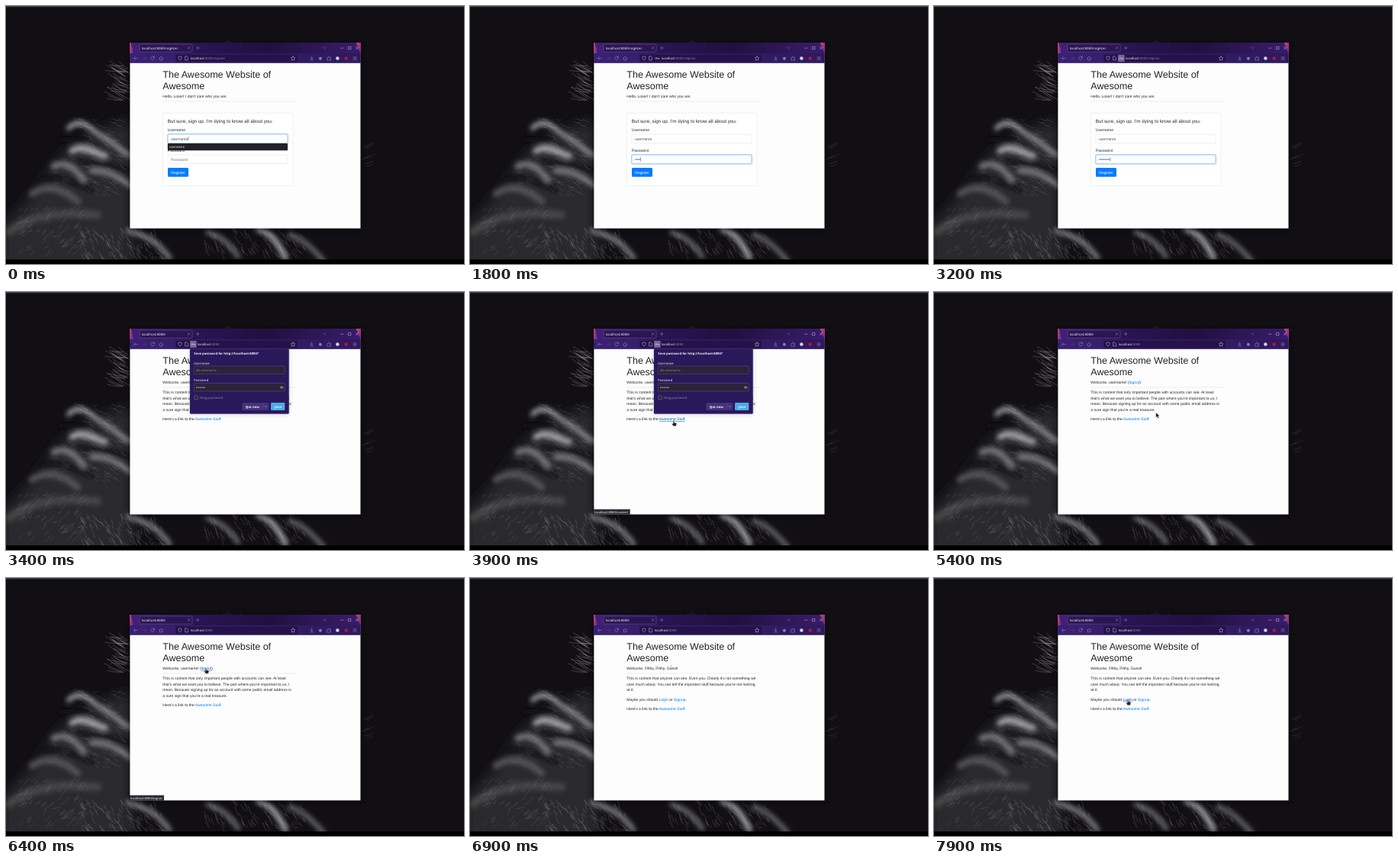
Write an HTML page that moves like this. It is 600 by 338 pixels and loops after 8000 ms.

```html
<!DOCTYPE html>
<html lang="en">
<head>
<meta charset="utf-8">
<title>Sign-up walkthrough</title>
<style>
html, body { margin: 0; width: 100%; height: 100%; overflow: hidden; background: #110f13; }
svg { display: block; width: 100%; height: 100%; }
text { white-space: pre; text-rendering: geometricPrecision; }
.page text { font: 5.02px "Liberation Sans", Arial, sans-serif; fill: #212529; }
.page .h1 { font-size: 12.55px; }
.page .h5 { font-size: 6.27px; }
.page .link { fill: #007bff; }
.page .hover { fill: #0056b3; text-decoration: underline; }
.page .value { fill: #495057; }
.page .hint { fill: #6c757d; }
.page .white { fill: #fff; }
.field { fill: #fff; stroke: #ced4da; stroke-width: .4; }
.ring { fill: none; stroke: #80bdff; stroke-width: .6; }
.glow { fill: none; stroke: #007bff; stroke-opacity: .25; stroke-width: 1; }
.ui text { font: 4.2px "Noto Sans", "Open Sans", sans-serif; fill: #f3effc; }
.ui .dim { fill: #8d7fb3; }
.ui .bold { font-weight: 600; }
.ui .key { text-decoration: underline; }
.ui #tab { font-size: 4.4px; }
.ui #statusText { font-size: 4.05px; }
.icon { fill: none; stroke: #cfc3ea; stroke-width: .5; stroke-linecap: round; stroke-linejoin: round; }
.muted { opacity: .7; }
.faint { opacity: .3; }
</style>
</head>
<body>
<svg viewBox="0 0 600 338" preserveAspectRatio="none">
  <defs>
    <filter id="soft" x="-30%" y="-30%" width="160%" height="160%"><feGaussianBlur stdDeviation="3.4"/></filter>
    <filter id="haze" x="-30%" y="-30%" width="160%" height="160%"><feGaussianBlur stdDeviation="9"/></filter>
    <filter id="shade" x="-10%" y="-10%" width="120%" height="120%"><feGaussianBlur stdDeviation="3"/></filter>
    <linearGradient id="bar"><stop offset="0" stop-color="#43207c"/><stop offset=".25" stop-color="#2b1556"/><stop offset=".6" stop-color="#20103f"/><stop offset="1" stop-color="#3a1c6a"/></linearGradient>
    <linearGradient id="tools"><stop offset="0" stop-color="#3a2070"/><stop offset="1" stop-color="#2f195c"/></linearGradient>
    <linearGradient id="pink" x2="1" y2="1"><stop offset="0" stop-color="#f0506e"/><stop offset="1" stop-color="#8a2a94"/></linearGradient>
    <clipPath id="desk"><rect y="2" width="600" height="330"/></clipPath>
  </defs>

  <rect width="600" height="338" fill="#110f13"/>
  <g clip-path="url(#desk)">
    <path d="M166 150C120 160 84 180 60 212 42 244 16 270-8 292V345H166z" fill="#2b2b2d" filter="url(#haze)"/>
    <g filter="url(#soft)" fill="none" stroke-linecap="round">
      <path d="M82 160C92 150 104 152 118 166" stroke="#9a9a9c" stroke-width="6"/>
      <path d="M86 190C100 180 116 194 130 196" stroke="#b2b2b4" stroke-width="7"/>
      <path d="M122 168C138 176 148 190 164 196" stroke="#8d8d90" stroke-width="6"/>
      <path d="M62 210C78 202 92 214 102 228" stroke="#7c7c7f" stroke-width="7"/>
      <path d="M112 216C130 214 148 224 164 236" stroke="#88888b" stroke-width="6"/>
      <path d="M34 246C54 232 76 240 94 256" stroke="#56565a" stroke-width="8"/>
      <path d="M4 296C30 276 70 268 120 274" stroke="#47474a" stroke-width="10"/>
      <path d="M160 294C184 300 202 312 214 330" stroke="#828285" stroke-width="6"/>
      <path d="M264 296C282 302 294 312 304 328" stroke="#6d6d70" stroke-width="6"/>
      <path d="M330 292C350 298 358 314 366 330" stroke="#a2a2a4" stroke-width="7"/>
      <path d="M372 300C390 306 402 318 416 334" stroke="#6a6a6d" stroke-width="6"/>
      <path d="M72 176C88 172 104 178 120 184M48 228C76 222 96 232 112 240M92 206C116 202 140 210 164 218" stroke="#0d0c0f" stroke-width="6"/>
    </g>
    <g id="fur" fill="none" stroke="#d4d4d6" stroke-linecap="round"/>
  </g>
  <rect width="600" height="1.3" fill="#45494c"/>
  <rect y="332" width="600" height="6" fill="#000"/>

  <rect x="162" y="49" width="303" height="244" fill="#000" opacity=".6" filter="url(#shade)"/>
  <rect x="162.4" y="48" width="302" height="243.4" fill="#fdfdfe"/>

  <g class="page">
    <text class="h1" x="205.3" y="94.4">The Awesome Website of</text>
    <text class="h1" x="205.3" y="109.4">Awesome</text>
    <path d="M205.3 125H380" stroke="#000" stroke-opacity=".13" stroke-width=".5"/>

    <g id="register">
      <text x="205.3" y="120.4">Hello, Loser! I don't care who you are.</text>
      <rect x="205.5" y="140.2" width="170.3" height="95.3" rx="1.3" fill="#fff" stroke="#000" stroke-opacity=".14" stroke-width=".4"/>
      <text class="h5" x="211.8" y="152.7">But sure, sign up. I'm dying to know all about you.</text>
      <text x="211.8" y="163.8">Username</text>
      <text x="211.8" y="190.5">Password</text>
      <rect class="field" x="212" y="168" width="157" height="11.7" rx="1.3"/>
      <rect class="field" x="212" y="195" width="157" height="11.7" rx="1.3"/>
      <g id="focusName"><rect class="glow" x="211.5" y="167.5" width="158" height="12.7" rx="1.7"/><rect class="ring" x="212" y="168" width="157" height="11.7" rx="1.3"/></g>
      <g id="focusPass"><rect class="glow" x="211.5" y="194.5" width="158" height="12.7" rx="1.7"/><rect class="ring" x="212" y="195" width="157" height="11.7" rx="1.3"/></g>
      <text class="value" x="216" y="175.7">username</text>
      <text id="hint" class="hint" x="216" y="202.7">Password</text>
      <g id="dots" fill="#495057"/>
      <rect id="caret" width=".45" height="5.4" fill="#222"/>
      <rect x="212" y="212" width="27" height="11.8" rx="1.3" fill="#007bff"/>
      <text class="white" x="216" y="219.7">Register</text>
    </g>

    <g id="member">
      <text x="205.3" y="120.4">Welcome, username! (<tspan id="logout" class="link">logout</tspan>)</text>
      <g id="memberBody">
        <text x="205.3" y="133">This is content that only important people with accounts can see. At least</text>
        <text x="205.3" y="140.5">that's what we want you to believe. The part where you're important to us, I</text>
        <text x="205.3" y="148">mean. Because signing up for an account with some public email address is</text>
        <text x="205.3" y="155.6">a sure sign that you're a real treasure.</text>
        <text x="205.3" y="168.1">Here's a link to the <tspan id="stuff" class="link">Awesome Stuff</tspan>.</text>
      </g>
    </g>

    <g id="guest">
      <text x="205.3" y="120.4">Welcome, Filthy, Filthy, Guest!</text>
      <text x="205.3" y="133">This is content that anyone can see. Even you. Clearly it's not something we</text>
      <text x="205.3" y="140.5">care much about. You can tell the important stuff because you're not looking</text>
      <text x="205.3" y="148">at it.</text>
      <text x="205.3" y="160.7">Maybe you should <tspan id="login" class="link">Login</tspan> or <tspan class="link">Signup</tspan>.</text>
      <text x="205.3" y="173.2">Here's a link to the <tspan id="guestStuff" class="link">Awesome Stuff</tspan>.</text>
    </g>
  </g>

  <g class="ui">
    <rect x="162" y="48" width="302.7" height="14.2" fill="url(#bar)"/>
    <path d="M162 48h1.6l3.2 14.2H162z" fill="url(#pink)" opacity=".75"/>
    <path d="M458.5 48h6.2v14.2z" fill="url(#pink)" opacity=".8"/>
    <rect x="162" y="62" width="302.7" height="12.8" fill="url(#tools)"/>
    <rect x="175" y="50" width="69" height="10.3" rx="1.3" fill="#2b1653" stroke="#7a68a3" stroke-width=".45"/>
    <text id="tab" x="177.8" y="56.8"></text>
    <g class="muted">
      <path class="icon" d="M238.3 53.8l2.4 2.4m0-2.4l-2.4 2.4M249.3 55h3.8m-1.9-1.9v3.8M415.7 54.3l1.7 1.6 1.7-1.6"/>
      <path class="icon" d="M172.3 68.5h-5m2-2l-2 2 2 2M194.2 67.2a2.3 2.3 0 1 0 .2 1.8M194.5 65.7v1.7h-1.7M200.7 68.5l2.5-2.3 2.5 2.3m-4.2-.4v2.8h3.4v-2.8"/>
      <path class="icon faint" d="M178.5 68.5h5m-2-2l2 2-2 2"/>
    </g>
    <path class="icon" d="M438.7 55.2h3.4M448.7 53.4h3.2v3.2h-3.2zM458.6 53.6l2.8 2.8m0-2.8l-2.8 2.8"/>
    <rect x="222.3" y="63.4" width="159.5" height="10.2" rx="1.3" fill="#25124a"/>
    <path class="icon" d="M228 66l2.1.8c0 2.2-.5 3.3-2.1 4.2-1.6-.9-2.1-2-2.1-4.2zM235 66h2.2l1.2 1.2v3.7H235z"/>
    <path class="icon" d="M376 65.7l.9 1.8 2 .3-1.5 1.4.4 2-1.8-1-1.8 1 .4-2-1.5-1.4 2-.3z"/>
    <g id="keyIcon">
      <rect id="keyBox" x="241" y="64" width="8.6" height="9" rx="1" fill="#75659c"/>
      <path class="icon" d="M244.8 68.5h3.2v1.2m-1.3-1.2v1"/><circle class="icon" cx="243.7" cy="68.5" r="1.1"/>
    </g>
    <text id="url" y="70"><tspan>localhost</tspan><tspan id="rest" class="dim"></tspan></text>
    <g class="muted">
      <path class="icon" d="M400.5 65.8v3.4m-1.5-1.4l1.5 1.5 1.5-1.5M398.5 70.8h4M421 67.5h1.5c-.5-2 2-2 1.5 0h1.5v1.3c-1.7-.4-1.7 1.8 0 1.4v1H421zM455 66.8h4M455 68.5h4M455 70.2h4"/>
    </g>
    <circle cx="411.8" cy="68.7" r="2" fill="#6f86c4"/>
    <circle cx="434.3" cy="68.5" r="2.3" fill="#d5ced8"/>
    <rect x="443.6" y="66.6" width="4" height="4" fill="#a81a38"/>

    <g id="suggest">
      <rect x="211.8" y="180" width="157.2" height="9.2" rx="1" fill="#222127"/>
      <text x="214" y="186.3">username</text>
    </g>

    <g id="popup">
      <rect x="241" y="75.5" width="130" height="85" fill="#000" opacity=".14" filter="url(#shade)"/>
      <rect x="241" y="74.6" width="129.6" height="85" rx="1.3" fill="#2b185a" stroke="#3d2870" stroke-width=".4"/>
      <text class="bold" x="246.3" y="82.4">Save password for http://localhost:8080?</text>
      <text x="246.3" y="94.7">Username</text>
      <text x="246.3" y="117.3">Password</text>
      <g fill="#2b2439" stroke="#6b6082" stroke-width=".4">
        <rect x="246.3" y="97" width="119" height="10.6" rx="1"/>
        <rect x="246.3" y="119.5" width="119" height="10.6" rx="1"/>
        <rect x="246.5" y="135.8" width="4.8" height="4.8" rx=".7" stroke="#9c92b4"/>
      </g>
      <text class="dim" x="248.8" y="103.7">No username</text>
      <g id="savedDots" fill="#eee"/>
      <ellipse class="icon" cx="361" cy="125" rx="1.7" ry="1.1"/><circle cx="361" cy="125" r=".6" fill="#ddd"/>
      <text class="dim" x="253.4" y="139.7">Sho<tspan class="key">w</tspan> password</text>
      <rect x="309.3" y="145" width="35" height="10" rx="1.2" fill="#45317a"/>
      <path d="M336.3 146.3v7.4" stroke="#7866a5" stroke-width=".4"/>
      <path class="icon" d="M338.9 149.5l1.4 1.3 1.4-1.3"/>
      <text class="bold" x="314" y="151.5"><tspan class="key">N</tspan>ot now</text>
      <rect x="347" y="145" width="18.3" height="10" rx="1.2" fill="#4baae9"/>
      <text class="bold" x="351.4" y="151.5"><tspan class="key">S</tspan>ave</text>
    </g>

    <g id="status">
      <rect id="statusBox" x="162" y="284.6" height="7" fill="#2b2a31"/>
      <text id="statusText" x="163.3" y="289.6"></text>
    </g>
  </g>

  <g id="mouse" stroke-linejoin="round">
    <path id="arrow" d="M0 0v6.5l1.6-1.4 1 2.3 1.2-.5-1-2.3h2.1z" fill="#111" stroke="#eee" stroke-width=".4"/>
    <path id="hand" d="M-.7 0q.7-.7 1.3 0v2.4l2.6.6q.8.3.6 1.3l-.7 2.9h-3.5L-2.4 4.4q.2-1 1.7-.2z" fill="#222" stroke="#eee" stroke-width=".4"/>
    <path id="beam" d="M-.7-2.4h1.4M0-2.4v4.4M-.7 2h1.4" fill="none" stroke="#777" stroke-width=".4"/>
  </g>
</svg>
<script>
const LOOP = 8000, STEP = 100;
const $ = id => document.getElementById(id);
const show = (id, on) => $(id).setAttribute("display", on ? "inline" : "none");
const within = (t, a, b) => t >= a && t < b;
const clamp = v => Math.max(0, Math.min(1, v));

// Fur: x, y, width, height, count, angle in degrees, length, opacity
let seed = 7;
const rand = () => (seed = (seed * 16807) % 2147483647) / 2147483647;
const tufts = [
  [152, 74, 12, 54, 34, 200, 24, .4],
  [96, 148, 60, 50, 50, 205, 11, .25],
  [60, 200, 100, 50, 70, 210, 10, .2],
  [20, 262, 90, 60, 110, 140, 9, .2],
  [96, 290, 110, 40, 110, 55, 10, .3],
  [260, 290, 130, 34, 80, 55, 11, .28],
  [282, 47, 30, 3, 8, 200, 6, .2],
  [464, 184, 8, 28, 6, -20, 14, .2]
];
function tuft([x, y, w, h, n, angle, len, alpha]) {
  let d = "";
  for (let i = 0; i < n; i++) {
    const a = (angle + rand() * 36 - 18) * Math.PI / 180, l = len * (.5 + rand() * .6);
    const dx = Math.cos(a) * l, dy = Math.sin(a) * l;
    d += `M${x + rand() * w} ${y + rand() * h}q${dx / 2} ${dy / 2 + 2} ${dx} ${dy}`;
  }
  return `<path d="${d}" stroke-width=".6" opacity="${alpha}"/>`;
}
$("fur").innerHTML = tufts.map(tuft).join("");

const KEYS = [1100, 1300, 1600, 1800, 2400, 2500, 2600, 2900];
const row = (x, y, gap, r) => KEYS.map((_, i) => `<circle cx="${x + i * gap}" cy="${y}" r="${r}"/>`).join("");
$("dots").innerHTML = row(216.9, 201, 1.8, .72);
$("savedDots").innerHTML = row(249.6, 125, 1.55, .6);

// Pointer stops: time, x, y
const PATH = [
  [3500, 300, 196], [3800, 266.8, 168.5], [4300, 266.8, 168.5], [4800, 203, 69],
  [4900, 203, 69], [5000, 300, 190], [5200, 300, 190], [5400, 290.7, 158],
  [5700, 326, 196], [6000, 261, 122], [6100, 262, 118], [6600, 262, 118],
  [6700, 263.6, 117], [6900, 263.6, 117], [7100, 265, 170], [7250, 265, 170],
  [7500, 203, 69], [7600, 203, 69], [7800, 254, 159.5], [8000, 254, 159.5]
];
function pointer(t) {
  const i = PATH.findIndex(p => p[0] > t);
  const [t0, x0, y0] = PATH[i - 1], [t1, x1, y1] = PATH[i];
  const u = (t - t0) / (t1 - t0), k = u * u * (3 - 2 * u);
  return [x0 + (x1 - x0) * k, y0 + (y1 - y0) * k];
}

function drawForm(t) {
  const swap = clamp((t - 100) / 200), typed = KEYS.filter(k => k <= t).length;
  show("suggest", t < 100);
  $("focusName").setAttribute("opacity", 1 - swap);
  $("focusPass").setAttribute("opacity", swap);
  show("hint", !typed);
  [...$("dots").children].forEach((c, i) => c.setAttribute("display", i < typed ? "inline" : "none"));
  $("caret").setAttribute("x", t < 200 ? 238.7 : 216 + typed * 1.8 + .4);
  $("caret").setAttribute("y", t < 200 ? 171.2 : 198.2);
}

function drawChrome(t) {
  const path = t < 3300 ? "/register" : within(t, 4300, 4900) ? "/content" : "";
  const key = within(t, 1100, 4300);
  $("tab").textContent = "localhost:8080" + (path || "/");
  $("rest").textContent = ":8080" + path;
  $("url").setAttribute("x", key ? 250.8 : 242);
  show("keyIcon", key);
  show("keyBox", within(t, 3200, 4200));
  show("popup", within(t, 3300, 4200));
  $("popup").setAttribute("opacity", clamp((t - 3200) / 200));

  const link = within(t, 3800, 4300) || within(t, 7100, 7300) ? "content" : within(t, 6100, 6700) ? "logout" : "";
  show("status", link);
  $("statusText").textContent = "localhost:8080/" + link;
  $("statusBox").setAttribute("width", link === "logout" ? 45 : 47.7);
}

function drawPointer(t) {
  const hovers = {
    stuff: within(t, 3800, 4300), logout: within(t, 6100, 6700),
    guestStuff: within(t, 7100, 7300), login: t >= 7800
  };
  for (const id in hovers) $(id).classList.toggle("hover", hovers[id]);
  const hand = Object.values(hovers).some(Boolean), beam = within(t, 6700, 7000);
  show("mouse", t >= 3500);
  show("hand", hand);
  show("beam", beam);
  show("arrow", !hand && !beam);
  if (t >= 3500) $("mouse").setAttribute("transform", `translate(${pointer(t)})`);
}

function draw(t) {
  show("register", t < 3300);
  show("member", within(t, 3300, 6700));
  show("memberBody", !within(t, 4300, 5000));
  show("guest", t >= 6700);
  drawForm(t);
  drawChrome(t);
  drawPointer(t);
}

const start = performance.now();
function tick(now) {
  const t = Math.max(0, now - start) % LOOP;
  draw(Math.floor(t / STEP) * STEP);
  requestAnimationFrame(tick);
}
draw(0);
requestAnimationFrame(tick);
</script>
</body>
</html>
```
